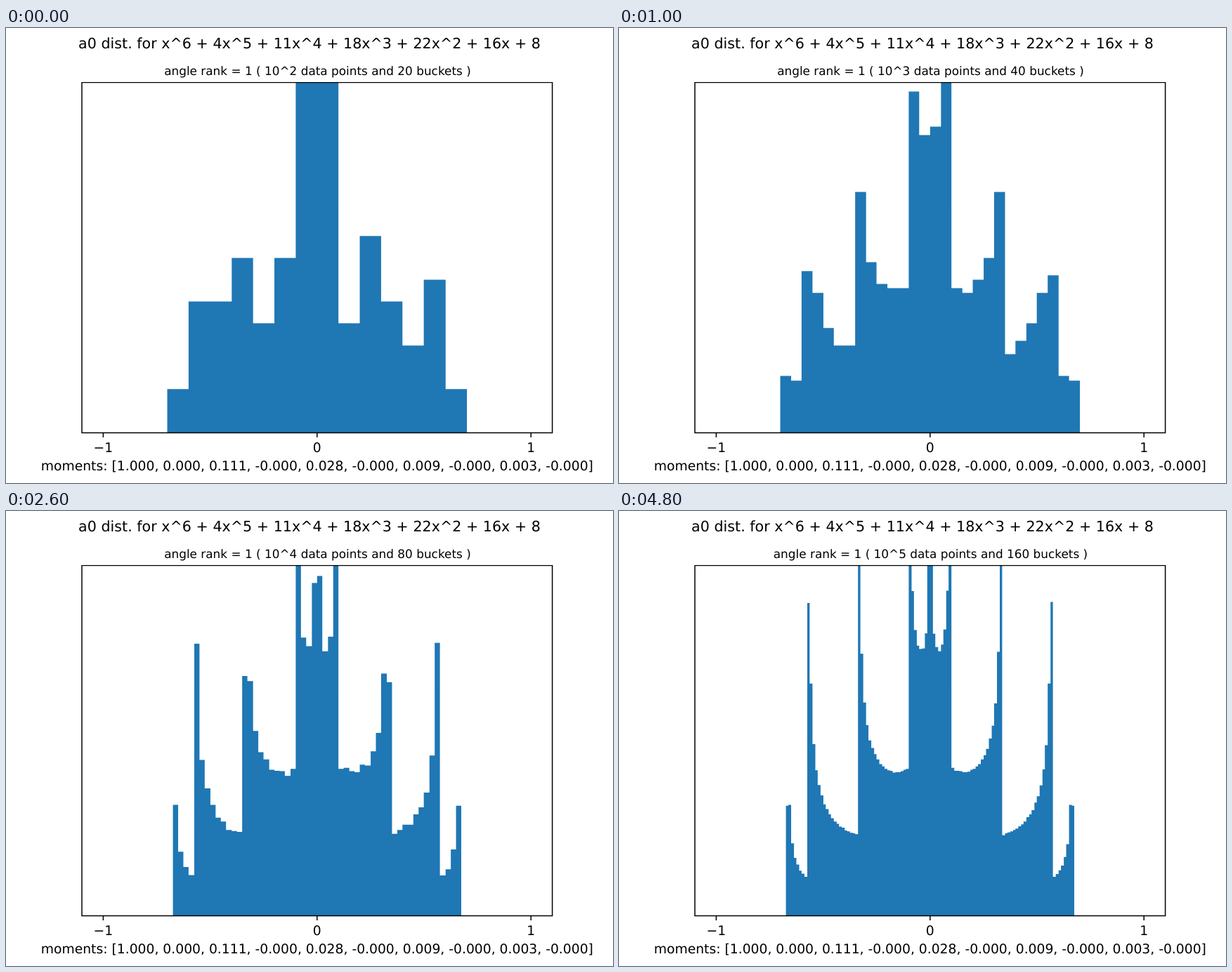
An HTML page for the animation above (6 s loop, 864x648 px).

```html
<!DOCTYPE html>
<html lang="en">
<head>
<meta charset="utf-8">
<title>a0 distribution</title>
<style>
  html, body { margin: 0; width: 100%; height: 100%; overflow: hidden; background: #fff; }
  svg { display: block; width: 864px; height: 648px; }
  text {
    font-family: "DejaVu Sans", sans-serif;
    font-size: 27.78px;
    text-anchor: middle;
    text-rendering: geometricPrecision;
  }
  #heading { font-size: 30.56px; letter-spacing: 0.03px; }
  #title { font-size: 25px; }
  .axis { fill: none; stroke: #000; stroke-width: 2.22; }
</style>
</head>
<body>
<svg viewBox="0 0 1280 960">
  <clipPath id="plot"><rect x="160" y="115" width="992" height="739"/></clipPath>
  <path id="bars" fill="#1f77b4" clip-path="url(#plot)"/>
  <path class="axis" d="M160 115H1152V854H160ZM205 854v9.72M656 854v9.72M1107 854v9.72"/>
  <text id="heading" x="640" y="43">a0 dist. for x^6 + 4x^5 + 11x^4 + 18x^3 + 22x^2 + 16x + 8</text>
  <text id="title" x="657" y="99"></text>
  <text x="205" y="895">−1</text>
  <text x="656" y="895">0</text>
  <text x="1107" y="895">1</text>
  <text x="656" y="934">moments: [1.000, 0.000, 0.111, -0.000, 0.028, -0.000, 0.009, -0.000, 0.003, -0.000]</text>
</svg>
<script>
const LOOP = 6000, STEP = 1000, STAGES = 4;
const ZERO_X = 656, UNIT = 992 / 2.2;
const BASE = 854.4, HEIGHT = 739.2;
const Y_MAX = 3.2; // axis limit, relative to the mean count per bucket

// The polynomial is (x^2 + x + 2)^2 (x^2 + 2x + 2); these are its root angles.
const ALPHA = Math.acos(-1 / Math.sqrt(8));
const BETA = 3 * Math.PI / 4;

function histogram(points, buckets) {
  const counts = new Array(buckets).fill(0);
  for (let r = 1; r <= points; r++) {
    const a0 = (Math.cos(r * ALPHA) + Math.cos(r * BETA)) / 3;
    counts[Math.floor((a0 + 1) / 2 * buckets)]++;
  }
  return counts;
}

// Stepped silhouette of the histogram, snapped to whole units.
function outline(counts, points) {
  const n = counts.length;
  const edge = k => Math.round(ZERO_X + (2 * k / n - 1) * UNIT);
  const top = c => Math.round(BASE - HEIGHT * c * n / (points * Y_MAX));
  const steps = counts.map((c, k) => `V${top(c)}H${edge(k + 1)}`);
  return `M${edge(0)} ${top(0)}${steps.join("")}V${top(0)}Z`;
}

const stages = Array.from({ length: STAGES }, (_, i) => {
  const points = 10 ** (i + 2), buckets = 20 * 2 ** i;
  return {
    title: `angle rank = 1 ( 10^${i + 2} data points and ${buckets} buckets )`,
    path: outline(histogram(points, buckets), points)
  };
});

const bars = document.getElementById("bars");
const title = document.getElementById("title");
let shown = -1;

function render(time) {
  const i = Math.min(STAGES - 1, Math.floor((time % LOOP) / STEP));
  if (i === shown) return;
  shown = i;
  bars.setAttribute("d", stages[i].path);
  title.textContent = stages[i].title;
}

const start = performance.now();
function tick() {
  render(performance.now() - start);
  requestAnimationFrame(tick);
}
tick();
</script>
</body>
</html>
```
